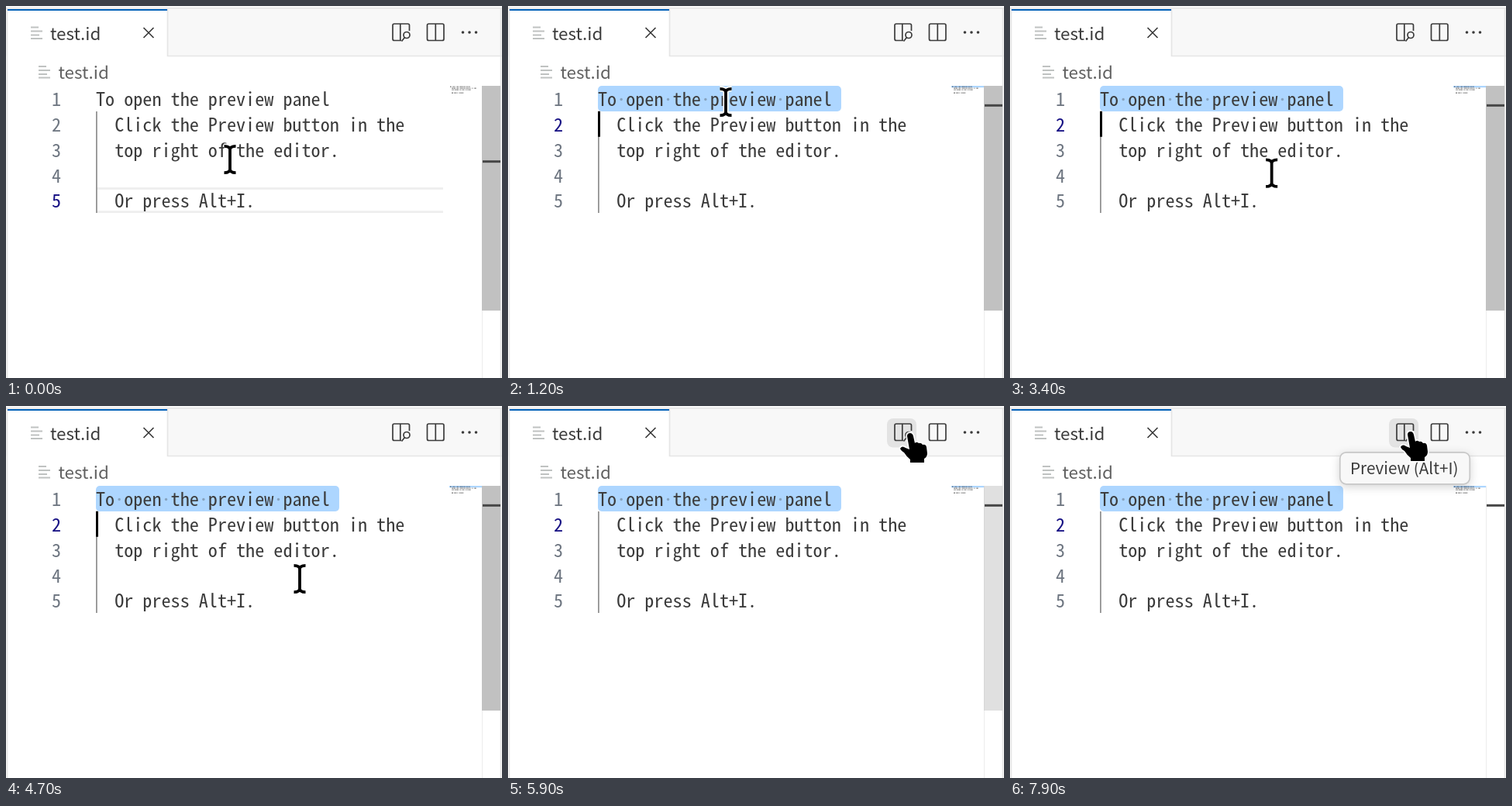
Write an HTML page that moves like this. It is 640 px wide and 480 px high and loops after 8 s.

```html
<!DOCTYPE html>
<html lang="en">
<head>
<meta charset="utf-8">
<title>Opening the preview panel</title>
<style>
  html, body { margin: 0; width: 100%; height: 100%; overflow: hidden; background: #fff; }
  svg { display: block; width: 640px; height: 480px; }
  text { font: 22.4px "Noto Sans CJK JP", "Noto Sans CJK SC", "Noto Sans", sans-serif; fill: #3b3b3b; }
  .code text { font: 24.15px "Noto Sans Mono CJK JP", "Noto Sans Mono CJK SC", "Noto Sans Mono", monospace; }
  .icon { fill: none; stroke: #3b3b3b; stroke-width: 1.7; }
  .pointer { stroke: #fff; stroke-width: 3.4; stroke-linejoin: round; paint-order: stroke; }
  #hover { filter: drop-shadow(0 3px 6px rgba(0, 0, 0, .16)); }
</style>
</head>
<body>
<svg viewBox="0 0 640 480">
  <defs>
    <path id="fileIcon" d="M0 1h10M0 6h15M0 11h11M0 15.5h15" stroke="#bfc2c1" stroke-width="1.8"/>
    <path id="beamShape" d="M-7.5 -17.2C-2.5 -17.2 0 -15.5 0 -12.5V12.5C0 15.5 -2.5 17.2 -7.5 17.2M7.5 -17.2C2.5 -17.2 0 -15.5 0 -12.5V12.5C0 15.5 2.5 17.2 7.5 17.2" fill="none"/>
  </defs>

  <!-- Tab bar and breadcrumb -->
  <rect width="640" height="65" fill="#f8f8f8"/>
  <rect x="2" y="4" width="206" height="62" fill="#fff"/>
  <path d="M0 3H640M208.5 4V64.5H640M1.5 3V480M638.5 3V480" fill="none" stroke="#e5e5e5" stroke-width="1.7"/>
  <rect x="2" y="4" width="206" height="2" fill="#005fb8"/>
  <use href="#fileIcon" x="32" y="26.5"/>
  <text x="57" y="43.5">test.id</text>
  <path class="icon" d="M177.5 28l13 13m0-13l-13 13"/>
  <use href="#fileIcon" x="42" y="77"/>
  <text x="67.5" y="94" style="fill:#616161">test.id</text>

  <!-- Toolbar -->
  <rect id="button" x="489" y="16" width="38" height="37.5" rx="8" fill="#e3e3e3"/>
  <path class="icon" d="M510 44.5H501q-2 0-2-2V25q0-2 2-2H518.500q2 0 2 2V32M508.800 23V44.500M514.500 40.500L510.500 45.500"/>
  <circle class="icon" cx="517" cy="37.500" r="4"/>
  <rect class="icon" x="543.5" y="23" width="21.5" height="21.5" rx="2"/>
  <path class="icon" d="M554.3 23V44.500"/>
  <g fill="#3b3b3b"><circle cx="589.500" cy="34" r="1.8"/><circle cx="598" cy="34" r="1.8"/><circle cx="606.500" cy="34" r="1.8"/></g>

  <!-- Editor -->
  <g id="currentLine" fill="#eee"><rect x="117" width="447" height="2.8"/><rect x="117" y="30.2" width="447" height="2.8"/></g>
  <rect id="mark" y="103" height="33" rx="5"/>
  <rect x="116" y="136" width="1.8" height="131" fill="#939393"/>
  <g id="code" class="code"></g>
  <g id="dots" fill="#33333350"></g>
  <rect id="caret" width="3" height="33"/>

  <!-- Minimap, scrollbar and ruler -->
  <rect id="mapMark" y="103" height="2.2" fill="#add6ff"/>
  <g id="minimap" fill="#3b3b3b"></g>
  <path d="M614.5 103V480" stroke="#ececec"/>
  <rect id="slider" x="614" y="103" width="24" height="290" fill="#c1c1c1"/>
  <rect id="rulerWord" x="622" y="104" width="9" height="23" fill="#999"/>
  <rect id="rulerLine" x="615" width="23" height="3" fill="#464646"/>

  <g id="hover">
    <rect x="425.800" y="59.800" width="167.500" height="41" rx="8" fill="#f8f8f8" stroke="#c8c8c8" stroke-width="1.7"/>
    <text x="439" y="87.500" style="font-size:20.7px">Preview (Alt+I)</text>
  </g>

  <!-- Mouse pointers -->
  <g id="beam"><use href="#beamShape" stroke="#fff" stroke-width="7"/><use href="#beamShape" stroke="#000" stroke-width="3.8"/></g>
  <path id="arrow" class="pointer" d="M0 0V22L5 17 9 25 12.500 23.500 9 16H16Z"/>
  <path id="hand" class="pointer" d="M-4 1Q-4-3 0-3 3-3 4 1L6 10Q8 7.500 11 10 14 9 16 12 20 11 21 15L22 23Q22 28 18 30V35H0V31Q-5 27-8 22-12 20-13 17-11 12.500-6 16L-1 18Z"/>
</svg>
<script>
const LOOP = 8000, LEFT = 116, TOP = 103, ROW = 32.77, CHAR = 12.075;
const lines = [
  "To open the preview panel",
  "  Click the Preview button in the",
  "  top right of the editor.",
  "",
  "  Or press Alt+I."
];
const $ = id => document.getElementById(id);
const set = (node, attrs) => { for (const k in attrs) node.setAttribute(k, attrs[k]); };
const show = (id, on) => { $(id).style.display = on ? "" : "none"; };
const add = (parent, tag, attrs, text = "") => {
  const node = document.createElementNS("http://www.w3.org/2000/svg", tag);
  set(node, attrs);
  node.textContent = text;
  parent.append(node);
  return node;
};
const column = c => LEFT + c * CHAR;

const numbers = lines.map((line, row) => {
  const y = TOP + 26.3 + row * ROW;
  const indent = line.search(/\S|$/);
  add($("code"), "text", { x: column(indent), y }, line.trim());
  [...line].forEach((ch, i) => {
    if (ch === " ") return;
    add($("minimap"), "rect", {
      x: 573 + i * 1.03, y: 103.500 + row * 2, width: 1, height: 1.3,
      opacity: .35 + ch.charCodeAt(0) % 5 * .09
    });
  });
  return add($("code"), "text", { x: 59, y });
});
numbers.forEach((node, row) => node.textContent = row + 1);
[...lines[0]].forEach((ch, i) => {
  if (ch === " ") add($("dots"), "circle", { cx: column(i + .5), cy: 120.500, r: 1.7 });
});

// Mouse path: time, x, y
const path = [
  [100, 289, 198], [400, 287, 172], [700, 281, 124], [2700, 281, 124],
  [3000, 291, 150], [3300, 326, 205], [3600, 361, 237], [3800, 362, 238],
  [4200, 362, 238], [4700, 379, 223], [5100, 421, 175], [5400, 474, 88],
  [5600, 503, 51], [5900, 519, 38], [6100, 519, 38], [6400, 512, 41],
  [6700, 505, 36], [7000, 506, 27], [7300, 512, 24], [7600, 520, 29], [7900, 517, 36]
];
function mouseAt(t) {
  const i = path.findIndex(p => p[0] > t);
  if (i === 0) return path[0].slice(1);
  if (i < 0) return path[path.length - 1].slice(1);
  const [a, b] = [path[i - 1], path[i]];
  const f = (t - a[0]) / (b[0] - a[0]);
  return [a[1] + (b[1] - a[1]) * f, a[2] + (b[2] - a[2]) * f];
}

function caretVisible(t) {
  if (t < 800) return false;
  if (t < 1200) return true;
  const start = t < 2800 ? 1200 : 1300;
  return Math.floor((t - start) / 500) % 2 === 0;
}

function draw(t) {
  const clicked = t >= 800, wordSelected = t >= 1100, lineSelected = t >= 1200;
  const row = lineSelected ? 1 : clicked ? 0 : 4;
  const [x, y] = mouseAt(t);

  numbers.forEach((node, i) => node.style.fill = i === row ? "#171184" : "#6e7681");
  show("currentLine", !wordSelected);
  set($("currentLine"), { transform: `translate(0 ${TOP + row * ROW})` });

  const [from, to] = lineSelected ? [0, 26] : [12, 19];
  show("mark", t >= 1000);
  set($("mark"), {
    x: column(from), width: (to - from) * CHAR,
    fill: wordSelected ? "#add6ff" : "#d5d5d5", rx: wordSelected ? 5 : 0
  });
  show("dots", lineSelected);
  show("mapMark", wordSelected);
  set($("mapMark"), lineSelected ? { x: 572, width: 42 } : { x: 585, width: 7 });

  show("caret", caretVisible(t));
  set($("caret"), {
    x: lineSelected ? LEFT : column(wordSelected ? 19 : 14),
    y: TOP + row * ROW
  });

  show("rulerWord", t >= 1000 && !lineSelected);
  set($("rulerLine"), { y: TOP + row * 24.3 - (row ? .5 : 0) + (row === 4 ? -.5 : 0) });
  $("slider").style.opacity = Math.max(0, Math.min(1, (6300 - t) / 800));

  const overButton = x > 489 && x < 527 && y > 16 && y < 53.500;
  const pointer = overButton ? "hand" : y < TOP ? "arrow" : "beam";
  for (const id of ["hand", "arrow", "beam"]) show(id, id === pointer);
  set($(pointer), { transform: `translate(${x} ${y})` });
  show("button", overButton);
  show("hover", t >= 6300);
}

function tick() {
  // The screen advances in tenths of a second.
  draw(Math.floor(performance.now() % LOOP / 100) * 100);
  requestAnimationFrame(tick);
}
tick();
</script>
</body>
</html>
```
